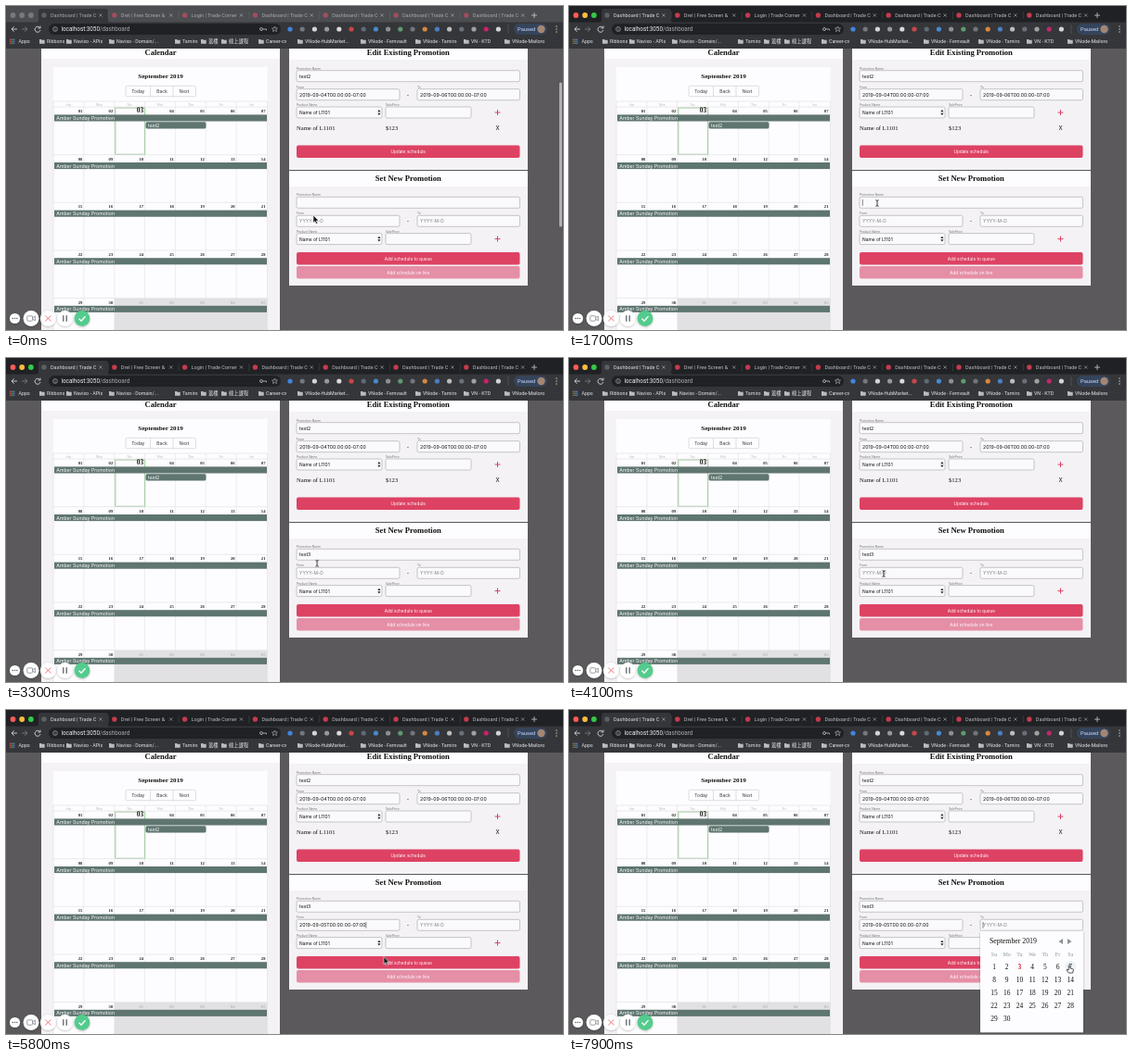
Recreate the animation shown at these times as an HTML page. Size 600 px wide and 350 px high, loop 8 s.

```html
<!DOCTYPE html>
<html lang="en">
<head>
<meta charset="utf-8">
<title>Promotion dashboard</title>
<style>
html, body { margin: 0; width: 100%; height: 100%; overflow: hidden; background: #5b595c; }
svg { display: block; width: 600px; height: 350px; }
text { white-space: pre; }
.sans { font-family: Inter, sans-serif; }
.serif { font-family: "Liberation Serif", serif; }
.ui { font-family: Roboto, "Noto Sans CJK TC", "Noto Sans CJK", sans-serif; }
.bold { font-weight: 700; }
#scrollbar { animation: fade 8s linear infinite; }
#cursor { animation: move 8s ease-in-out infinite; }
@keyframes fade {
  0%, 1.25% { opacity: 1; }
  3.75%, 100% { opacity: 0; }
}
@keyframes move {
  0%, 6% { transform: translate(331px, 226px); }
  10%, 17.5% { transform: translate(338px, 213px); }
  21%, 38% { transform: translate(332px, 213px); }
  45%, 56% { transform: translate(339px, 233px); }
  62%, 69% { transform: translate(384px, 278px); }
  79%, 88% { transform: translate(473px, 233px); }
  96%, 100% { transform: translate(539px, 276px); }
}
</style>
</head>
<body>
<svg id="stage" viewBox="0 0 600 350"></svg>
<script>
const LOOP = 8000;
const GREEN = '#5f7570', RED = '#dd4263', WHITE = '#fdfcfe';
const stage = document.getElementById('stage');
let rules = '', windows = 0;

const rect = (x, y, w, h, fill, extra = '') =>
  `<rect x="${x}" y="${y}" width="${w}" height="${h}" fill="${fill}" ${extra}/>`;
const dot = (x, y, r, fill, extra = '') =>
  `<circle cx="${x}" cy="${y}" r="${r}" fill="${fill}" ${extra}/>`;
const path = (d, stroke, width = 1, fill = 'none') =>
  `<path d="${d}" stroke="${stroke}" stroke-width="${width}" fill="${fill}"/>`;
const text = (s, x, y, size, fill = '#111', cls = 'sans', anchor = 'start') =>
  `<text x="${x}" y="${y}" font-size="${size}" fill="${fill}" class="${cls}" text-anchor="${anchor}">${s}</text>`;

// Shows the markup only from one time to another within each loop.
function during(from, to, markup) {
  const name = 'w' + windows++;
  const pct = ms => ms / LOOP * 100 + '%';
  rules += `@keyframes ${name}{0%{visibility:hidden}${pct(from)}{visibility:visible}${pct(to)}{visibility:hidden}}
    .${name}{animation:${name} 8s step-end infinite}`;
  return `<g class="${name}">${markup}</g>`;
}

function tabStrip(focused) {
  const lights = focused ? ['#fc5b57', '#fdbc40', '#34c84a'] : Array(3).fill('#77797d');
  const titles = ['Dashboard | Trade C', 'Drel | Free Screen &amp;', 'Login | Trade Corner'];
  let s = rect(0, 0, 600, 17.5, focused ? '#202124' : '#4b4d51');
  lights.forEach((c, i) => s += dot(7.5 + i * 9.7, 10, 2.9, c));
  s += path('M32 18Q35 18 35 15V6Q35 3 38 3H107Q110 3 110 6V15Q110 18 113 18Z', 'none', 0, '#35363a');
  for (let i = 0; i < 7; i++) {
    const x = 41 + i * 75.8;
    s += dot(x, 10, 2.7, i ? (focused ? '#c63a50' : '#a04e5d') : '#5c5f65');
    s += text(titles[i] || titles[0], x + 7, 12.2, 5.5, focused ? (i ? '#b9bcc0' : '#dcdee1') : '#a6a8ac', 'ui');
    s += path(`M${x + 59.3} 8.4l3.2 3.2m0-3.2l-3.2 3.2`, '#b5b8bd', .6);
    if (i) s += path(`M${x - 6.5} 6V14`, focused ? '#4a4c50' : '#66686c', .5);
  }
  return s + path('M569 7v6m-3-3h6', '#c8cace', .8);
}

function browser() {
  let s = rect(0, 17, 600, 29, '#35363a') + during(0, 500, tabStrip(false)) + during(500, LOOP, tabStrip(true));
  s += path('M12 25H6m2.7-2.7L6 25l2.7 2.7', '#d5d7da', .9);
  s += path('M17 25h6m-2.7-2.7L23 25l-2.7 2.7', '#77797d', .9);
  s += path('M36.3 23.2A3 3 0 1 0 37 26M37 21.5V24h-2.5', '#d5d7da', .9);
  s += rect(46, 19, 250, 12, '#202124', 'rx="6"');
  s += dot(53, 25, 2.4, 'none', 'stroke="#bdc1c6" stroke-width=".6"') + path('M53 24.7V26.5M53 23.5v.6', '#bdc1c6', .6);
  s += text('localhost:3050<tspan fill="#a5a9ae">/dashboard</tspan>', 59.5, 27, 6.3, '#eceef0', 'ui');
  s += dot(275, 25, 1.5, 'none', 'stroke="#bdc1c6" stroke-width=".8"') + path('M276.5 25h4v1.4', '#bdc1c6', .8);
  s += path('M289.5 22l.9 2h2.1l-1.6 1.4.6 2.1-2-1.2-2 1.2.6-2.1-1.6-1.4h2.1z', '#bdc1c6', .6);
  const icons = ['#3f86dd', '#74797f', '#d3d5d8', '#96999d', '#d9dadd', '#c94747', '#5f6b78', '#4889d0', '#8c8f94',
    '#5f9a72', '#717579', '#d9873f', '#4a7fc0', '#b9bbbf', '#67717b', '#9da1a5', '#c2266b', '#d3d5d8'];
  icons.forEach((c, i) => s += dot(306 + i * 13.2, 25, 2.6, c));
  s += path('M541 20V30', '#66686c', .5);
  s += rect(547, 19, 36, 12, '#35445b', 'rx="6"');
  s += text('Paused', 551, 27.1, 5.8, '#c3d9fb', 'ui') + dot(576.5, 25, 4.2, '#a48672');
  [22, 25, 28].forEach(y => s += dot(593, y, .7, '#d5d7da'));

  for (let i = 0; i < 9; i++)
    s += rect(4 + i % 3 * 2, 35.6 + (i / 3 | 0) * 2, 1.3, 1.3, ['#db5b4d', '#61a86b', '#5c91db'][i % 3]);
  s += text('Apps', 13.5, 40.3, 5.3, '#e4e6e9', 'ui');
  const marks = [['Ribbons', 44], ['Navixo - APIs', 73], ['Navixo - Domain/...', 119], ['Tamiro', 190],
    ['蓋樓', 218], ['線上課程', 240], ['Career-cv', 280], ['VNode-HubMarket...', 322], ['VNode - Fernvault', 390],
    ['VNode - Tamiro', 449], ['VN - KTD', 501], ['VNode-Mailoro', 545]];
  for (const [label, x] of marks) {
    s += path(`M${x - 8} 36h2l.7.8h3v4h-5.7z`, 'none', 0, '#b9bcc1');
    s += text(label, x, 40.3, 5.3, '#e4e6e9', 'ui');
  }
  return s;
}

function calendar() {
  const col = 32.85, row = 51.6;
  let s = rect(38, 46, 257, 304, '#f4f2f5') + rect(38, 46, 257, 11, WHITE) + rect(51, 66, 230.5, 284, WHITE);
  s += text('Calendar', 166.5, 52.8, 8.5, '#111', 'serif bold', 'middle');
  s += text('September 2019', 166.5, 77.8, 7.1, '#111', 'serif bold', 'middle');
  s += rect(129, 86.3, 75.5, 11.4, WHITE, 'rx="1.5" stroke="#c9c9cb" stroke-width=".6"');
  s += path('M155.5 86.3v11.4M180 86.3v11.4', '#c9c9cb', .6);
  [['Today', 142.3], ['Back', 168], ['Next', 192]].forEach(([l, x]) => s += text(l, x, 94, 4.9, '#373a3c', 'sans', 'middle'));
  s += rect(117, 316, 164.5, 34, '#e1e0e2');
  s += path('M51 350V103H281.5V350', '#dedde0', .6);
  'Sun Mon Tue Wed Thu Fri Sat'.split(' ').forEach((d, i) => {
    s += text(d, 51 + col * (i + .5), 107.5, 3.5, '#b5b5b8', 'serif', 'middle');
    if (i) s += path(`M${51 + col * i} 103V350`, '#e2e1e4', .6);
  });
  s += rect(117.8, 110, 31.8, 50.3, 'none', 'stroke="#a2cba2" stroke-width="1.1"');
  for (let r = 0; r < 5; r++) {
    const top = 109.1 + row * r;
    s += path(`M51 ${top}H281.5`, '#dedde0', .6);
    for (let c = 0; c < 7; c++) {
      const day = r * 7 + c + 1, off = day > 30, today = day === 3;
      const label = String(off ? day - 30 : day).padStart(2, '0');
      s += text(label, 51 + col * (c + 1) - 1.5, top + (today ? 6.3 : 6), today ? 7.3 : 4.6, off ? '#a3a3a5' : '#222',
        off ? 'serif' : 'serif bold', 'end');
    }
    s += rect(52, top + 8.3, 229, 7.1, GREEN) + text('Amber Sunday Promotion', 54.3, top + 13.8, 5.2, '#fff');
  }
  return s + rect(150.5, 125.3, 65, 7.1, GREEN, 'rx="1.6"') + text('test2', 153, 130.8, 5.2, '#fff');
}

const input = (x, y, w, label) =>
  text(label, x, y - 1, 3.3, '#77767a') +
  rect(x, y, w, 12, '#faf9fb', 'rx="1.6" stroke="#b0afb3" stroke-width=".7"');
const value = (s, x, y, fill = '#111', size = 5.2) => text(s, x + 3, y + 8, size, fill);
const button = (y, label, fill) =>
  rect(313, y, 240.5, 13.4, fill, 'rx="2"') + text(label, 433.3, y + 8.5, 4.7, '#fff', 'sans', 'middle');

// Fields shared by both forms; y is the top of the name input.
const fields = y =>
  input(313, y, 240.5, 'Promotion Name') + input(313, y + 20, 111, 'From') + input(443, y + 20, 110.5, 'To') +
  text('-', 433, y + 28, 7, '#333', 'serif', 'middle') +
  input(313, y + 39.3, 92, 'Product Name') + value('Name of L1101', 313, y + 39.3, '#111', 4.9) +
  path(`M400.3 ${y + 44.6}l1.6-2.2 1.6 2.2zM400.3 ${y + 46}l1.6 2.2 1.6-2.2z`, 'none', 0, '#222') +
  input(409, y + 39.3, 92, 'SalePrice') +
  path(`M529.5 ${y + 42.3}v6m-3-3h6`, RED, 1);

const caret = (x, y) => path(`M${x} ${y + 2.7}v6.8`, '#111', .5);

function forms() {
  const stamp = day => `2019-09-${day}T00:00:00-07:00`, hint = 'YYYY-M-D';
  let s = rect(305, 46, 257, 256, '#f4f2f5') + rect(305, 46, 257, 12, WHITE) + rect(305, 178, 257, 17, WHITE);
  s += path('M305 177.6H562', '#222', .8);
  s += text('Edit Existing Promotion', 433.3, 52.8, 8.6, '#111', 'serif bold', 'middle');
  s += text('Set New Promotion', 433.3, 189.2, 8.6, '#111', 'serif bold', 'middle');
  s += fields(69.7) + value('test2', 313, 69.7) + value(stamp('04'), 313, 89.7) + value(stamp('06'), 443, 89.7);
  s += text('Name of L1101', 313, 134, 6.6, '#111', 'serif') + text('$123', 409, 134, 6.6, '#111', 'serif');
  s += text('X', 529.5, 134, 6, '#111', 'sans', 'middle') + button(150.5, 'Update schedule', RED);

  s += fields(206.3);
  const advance = [0, .37, .96, 1.52, 1.89, 2.51];
  const typed = [1500, 1900, 2150, 2400, 2650, 2900, LOOP];
  advance.forEach((em, i) => {
    s += during(typed[i], typed[i + 1], value('test3'.slice(0, i), 313, 206.3));
    s += during(typed[i], Math.min(typed[i + 1], 3300), caret(316.3 + em * 5.2, 206.3));
  });
  s += during(0, 5500, value(hint, 313, 226.3, '#858489', 5));
  s += during(5500, LOOP, value(stamp('05'), 313, 226.3));
  s += during(5500, 6900, `<g id="stampCaret">${caret(0, 226.3)}</g>`);
  s += value(hint, 443, 226.3, '#858489', 5) + during(7000, LOOP, caret(446, 226.3));
  return s + button(266, 'Add schedule to queue', RED) + button(281, 'Add schedule on live', '#e58fa6');
}

function picker(x, hovered, hoverFrom, hoverTo) {
  const cx = c => x + 15 + c * 13.7, cy = r => 277.3 + r * 14.15;
  let s = rect(x, 238.8, 111, 109.5, WHITE, 'filter="url(#shadow)"');
  s += text('September 2019', x + 10, 252.2, 7.8, '#111', 'serif');
  s += path(`M${x + 89} 247l-4.5 3 4.5 3zM${x + 94} 247l4.5 3-4.5 3z`, 'none', 0, '#8b9291');
  s += during(hoverFrom, hoverTo, dot(cx((hovered - 1) % 7), 277.3, 6.2, '#ecf3f6'));
  ['Su', 'Mo', 'Tu', 'We', 'Th', 'Fr', 'Sa'].forEach((d, c) => s += text(d, cx(c), 266, 6, '#8b9898', 'serif', 'middle'));
  for (let d = 1; d <= 30; d++)
    s += text(d, cx((d - 1) % 7), cy((d - 1) / 7 | 0) + 2.4, 7.4, d === 3 ? '#d0232f' : '#111',
      d === 3 ? 'serif bold' : 'serif', 'middle');
  return s;
}

function recorder() {
  let s = '<g filter="url(#shadow)">' + dot(9.5, 337.5, 5.6, '#fff');
  [27, 45.3, 63.5].forEach(x => s += dot(x, 337.5, 8.4, '#fff'));
  s += dot(82, 337.5, 8.4, '#52cb8c') + '</g>';
  [7.2, 9.5, 11.8].forEach(x => s += dot(x, 337.5, .75, '#55565c'));
  s += rect(22.8, 334.8, 5.8, 5.4, 'none', 'rx=".8" stroke="#85868d" stroke-width=".8"');
  s += path('M28.8 336.7l2.6-1.5v4.6l-2.6-1.5', '#85868d', .8);
  s += path('M42.3 334.5l6 6m0-6l-6 6', '#ec6a70', .9);
  s += path('M61.8 334.2v6.6M65.2 334.2v6.6', '#55565c', 1.2);
  return s + path('M78.5 337.7l2.5 2.5 4.5-5', '#fff', 1.3);
}

function cursor() {
  const arrow = path('M0 0V8.2L1.9 6.5 3.2 9.4 4.6 8.8 3.3 6H5.8Z', '#fff', .6, '#111');
  const beam = path('M-1.6-3.3Q0-3.3 0-2.3Q0-3.3 1.6-3.3M0-2.5V2.5M-1.6 3.3Q0 3.3 0 2.3Q0 3.3 1.6 3.3', '#111', .8);
  const hand = path('M-.8.2Q0-.7.8.2V3L3.8 3.8Q4.5 4 4.3 5L3.6 8H-.7L-3 4.8Q-2.5 3.7-.8 5Z', '#111', .7, '#fff');
  return '<g id="cursor">' +
    [[0, 1500, arrow], [1500, 4600, beam], [4600, 4900, arrow], [4900, 5500, hand], [5500, 6200, arrow],
      [6200, 7150, beam], [7150, 7500, arrow], [7500, LOOP, hand]].map(w => during(...w)).join('') + '</g>';
}

stage.innerHTML =
  '<defs><filter id="shadow" x="-20%" y="-20%" width="140%" height="140%">' +
  '<feDropShadow dx="0" dy=".6" stdDeviation="1.2" flood-opacity=".3"/></filter></defs>' +
  rect(0, 45, 600, 305, '#5b595c') + browser() + calendar() + forms() +
  `<g id="scrollbar">${rect(596, 82.5, 3, 156, '#b3b1b4', 'rx="1.5"')}</g>` +
  during(4400, 5500, picker(313, 5, 4900, 5500)) +
  during(7000, LOOP, picker(443, 7, 7500, LOOP)) +
  recorder() + cursor();
document.head.appendChild(document.createElement('style')).textContent = rules;

// The caret sits right after the chosen date, whatever its rendered width.
const stampText = [...stage.querySelectorAll('text')].find(t => t.textContent.includes('09-05'));
const stampBox = stampText.getBBox();
document.getElementById('stampCaret').setAttribute('transform', `translate(${stampBox.x + stampBox.width + .3} 0)`);
</script>
</body>
</html>
```
